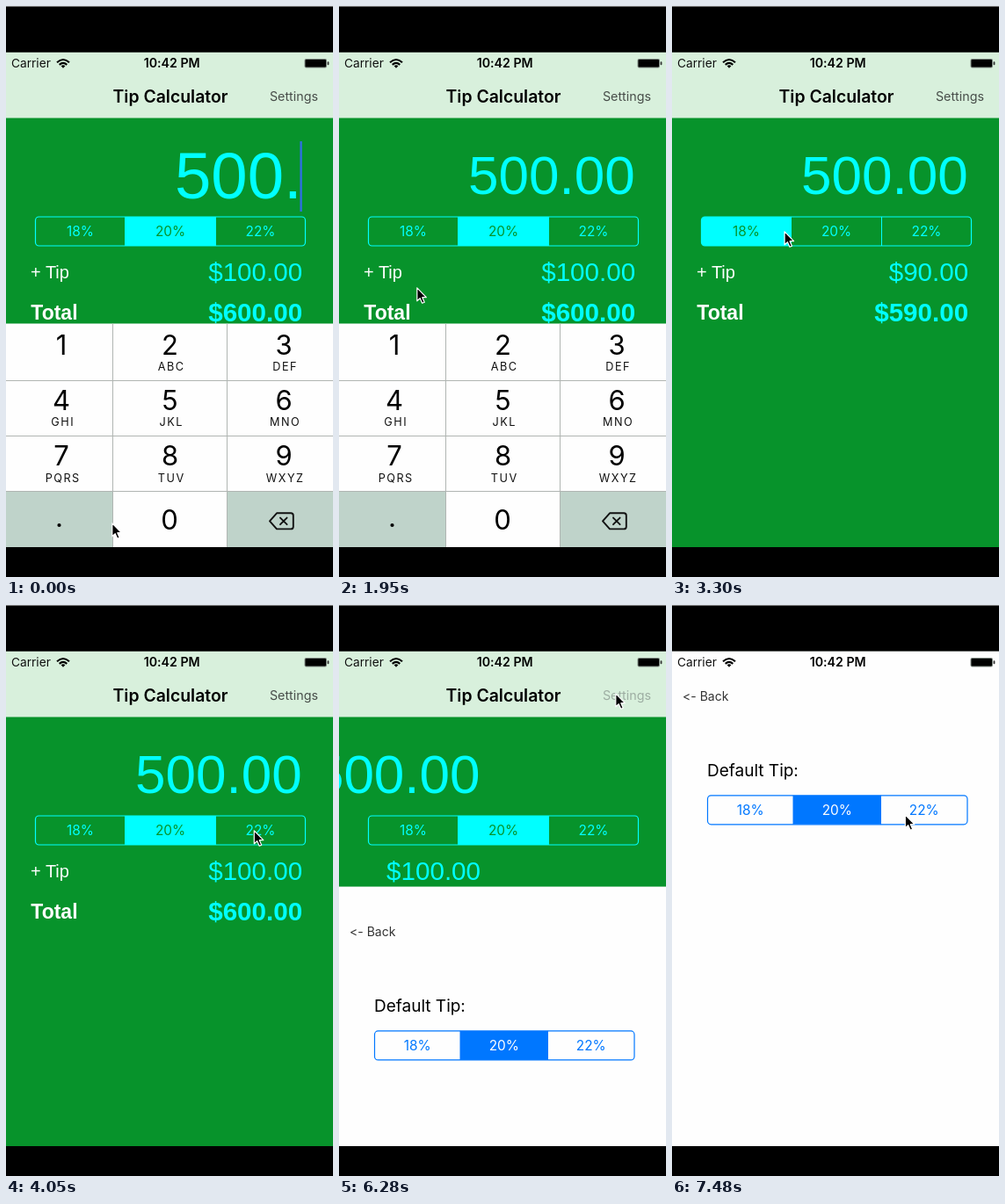
Write an HTML page that moves like this. It is 372 px wide and 650 px high and loops after 8000 ms.

```html
<!DOCTYPE html>
<html lang="en">
<head>
<meta charset="utf-8">
<title>Tip Calculator</title>
<style>
  html, body { margin: 0; width: 100%; height: 100%; overflow: hidden; background: #000; }
  svg { display: block; width: 100%; height: 100%; }
  text {
    font-family: Inter, Roboto, sans-serif; white-space: pre;
    font-variant-ligatures: none; font-feature-settings: "calt" 0, "liga" 0;
  }
  .sans { font-family: "Liberation Sans", Arial, sans-serif; }
  .caps { letter-spacing: 1.5px; }
</style>
</head>
<body>
<svg id="stage" viewBox="0 0 372 650"></svg>
<script>
const LOOP = 8000;
const GREEN = '#07932b', CYAN = '#00ffff', BLUE = '#0077ff';
const MINT = '#d8f0dc', KEY = '#bfd3ca', LINE = '#b0b5b2';
const stage = document.getElementById('stage');

function add(parent, tag, attrs, content) {
  const el = document.createElementNS('http://www.w3.org/2000/svg', tag);
  set(el, attrs);
  if (content !== undefined) el.textContent = content;
  parent.appendChild(el);
  return el;
}
function set(el, attrs) {
  for (const name in attrs) el.setAttribute(name, attrs[name]);
}
function rect(parent, x, y, width, height, fill, more) {
  return add(parent, 'rect', { x, y, width, height, fill, ...more });
}
function label(parent, content, x, y, size, fill, more) {
  return add(parent, 'text', { x, y, 'font-size': size, fill, ...more }, content);
}
const group = parent => add(parent, 'g', {});
const move = (el, x, y) => el.setAttribute('transform', `translate(${x} ${y})`);
const middle = { 'text-anchor': 'middle' };
const right = { 'text-anchor': 'end', class: 'sans' };

// Segmented control; edges holds the four vertical borders.
function segments(parent, edges, y, height, color, back) {
  const [left, , , end] = edges;
  const id = 'clip' + left;
  const clip = add(parent, 'clipPath', { id });
  const frame = { x: left, y, width: end - left, height, rx: 4 };
  add(clip, 'rect', frame);
  const fills = group(parent);
  fills.setAttribute('clip-path', `url(#${id})`);
  const parts = ['18%', '20%', '22%'].map((name, i) => {
    const x = edges[i], width = edges[i + 1] - x, mid = x + width / 2;
    const fill = rect(fills, x, y, width, height, color);
    const at = [mid, y + height / 2 + 5.4, 15.4];
    return {
      fill,
      dark: label(parent, name, ...at, back, middle),
      lit: label(parent, name, ...at, color, middle)
    };
  });
  add(parent, 'rect', { ...frame, fill: 'none', stroke: color, 'stroke-width': 1.2 });
  for (const x of edges.slice(1, 3)) rect(parent, x - .5, y, 1, height, color);
  return levels => parts.forEach((part, i) => {
    part.fill.setAttribute('opacity', levels[i]);
    part.dark.setAttribute('opacity', levels[i]);
    part.lit.setAttribute('opacity', 1 - levels[i]);
  });
}

// Calculator screen
rect(stage, 0, 53, 372, 563, GREEN);
const amounts = group(stage);
const bill = label(amounts, '', 336.7, 219, 74.4, CYAN, right);
label(amounts, '+ Tip', 28, 309.8, 20, '#fff', { class: 'sans' });
const tip = label(amounts, '', 337.2, 312.6, 29.6, CYAN, right);
label(amounts, 'Total', 28.3, 356.8, 23, '#fff', { class: 'sans', 'font-weight': 700 });
const total = label(amounts, '', 337.2, 359.2, 29.6, CYAN, { ...right, 'font-weight': 700 });
const caret = rect(stage, 334.4, 154, 2.4, 80, '#2f6fe0');
const pickRate = segments(stage, [33.5, 135.5, 238.5, 340.5], 240, 33, CYAN, GREEN);
rect(stage, 0, 52.5, 372, 75, MINT);
label(stage, 'Tip Calculator', 187, 109.5, 19.4, '#000', { ...middle, 'font-weight': 600 });
const settings = label(stage, 'Settings', 355, 108, 14.3, '#474d49', { 'text-anchor': 'end' });

// Keypad
const pad = group(stage);
rect(pad, 0, 361.5, 372, 254.5, '#fefefe');
rect(pad, 0, 552.5, 121.5, 63.5, KEY);
rect(pad, 251.5, 552.5, 120.5, 63.5, KEY);
const zero = rect(pad, 121.5, 552.5, 130, 63.5, KEY);
for (const x of [121, 251]) rect(pad, x, 361.5, 1, 254.5, LINE);
for (const y of [426, 489, 552]) rect(pad, 0, y, 372, 1, LINE);
const centers = [63, 186.5, 316];
['', 'ABC', 'DEF', 'GHI', 'JKL', 'MNO', 'PQRS', 'TUV', 'WXYZ'].forEach((caps, i) => {
  const x = centers[i % 3], y = 397 + 63.2 * (i / 3 | 0);
  label(pad, i + 1, x, y, 31, '#000', middle);
  label(pad, caps, x + 1.7, y + 18.2, 12.7, '#111', { ...middle, class: 'caps' });
});
label(pad, '0', 186, 595.5, 31, '#000', middle);
add(pad, 'circle', { cx: 60.5, cy: 591, r: 2.1, fill: '#000' });
add(pad, 'path', {
  d: 'M308 577.3H324Q326.8 577.3 326.8 580V592.7Q326.8 595.4 324 595.4H308L300 586.4ZM312 582.6l7.6 7.6m0 -7.6l-7.6 7.6',
  fill: 'none', stroke: '#111', 'stroke-width': 1.9, 'stroke-linejoin': 'round', 'stroke-linecap': 'round'
});

// Settings sheet
const sheet = group(stage);
rect(sheet, 0, 52.5, 372, 563.5, '#fefefe');
label(sheet, '<- Back', 12, 109, 14, '#333');
label(sheet, 'Default Tip:', 40, 195.2, 19, '#000');
segments(sheet, [40.5, 138, 237.5, 336], 216.8, 33, BLUE, '#fefefe')([0, 1, 0]);

// Status bar
label(stage, 'Carrier', 6, 70, 13.7, '#111');
label(stage, '10:42 PM', 188.7, 70, 14.2, '#000', { ...middle, 'font-weight': 600 });
const wifi = { fill: 'none', stroke: '#000', 'stroke-width': 2.1 };
add(stage, 'path', { d: 'M58 64.2Q65 57.8 72 64.2M60.7 66.9Q65 63 69.3 66.9', ...wifi });
add(stage, 'path', { d: 'M62.6 68.2Q65 66.2 67.4 68.2L65 70.8Z' });
rect(stage, 339.5, 60, 25.5, 10.5, '#808a83', { rx: 2 });
rect(stage, 340.5, 61, 23.5, 8.5, '#000', { rx: 1 });
rect(stage, 365.6, 63.3, 1.8, 4, '#333', { rx: .8 });

// Letterbox and pointer
rect(stage, 0, 0, 372, 52.5, '#000');
rect(stage, 0, 0, 372, 1, '#777');
rect(stage, 0, 616, 372, 34, '#000');
const pointer = add(stage, 'path', {
  d: 'M.8 .8V15.8L4.2 12.7L6.7 18.3L9.2 17.2L6.8 11.7H11.3Z',
  fill: '#000', stroke: '#fff', 'stroke-width': 1.2, 'stroke-linejoin': 'round'
});

// Pointer stops: time, x, y
const route = [
  [0, 120, 588], [150, 171, 588], [300, 171, 588], [450, 171, 584],
  [1050, 171, 584], [1650, 88, 320], [2100, 88, 320], [2550, 69.5, 254],
  [3150, 69.5, 254], [3450, 185, 258], [3900, 185, 258], [4050, 281.5, 256],
  [4780, 281.5, 256], [4930, 186.5, 252], [5380, 186.5, 252], [5530, 304, 107],
  [5680, 304, 107], [5980, 314, 100], [6280, 314, 100], [7030, 282, 246.5],
  [7180, 282, 246.5], [7480, 264.5, 238]
];
// Rate choices: time, segment
const picks = [[-1000, 1], [3000, 0], [3750, 1], [4350, 2], [5230, 1]];

const clamp = v => Math.max(0, Math.min(1, v));
const smooth = v => v * v * (3 - 2 * v);
const money = v => '$' + v.toFixed(2);

function snap(t) {
  const base = t < 4490 ? 0 : 4480;
  const step = base + Math.floor((t - base) / 150) * 150;
  return base ? step : Math.min(step, 4350);
}

function pointerAt(t) {
  const next = route.findIndex(stop => stop[0] > t);
  if (next < 0) return route[route.length - 1].slice(1);
  const [t0, x0, y0] = route[next - 1], [t1, x1, y1] = route[next];
  const p = smooth((t - t0) / (t1 - t0));
  return [x0 + (x1 - x0) * p, y0 + (y1 - y0) * p];
}

function drawRate(t) {
  const now = picks.filter(pick => pick[0] <= t).length - 1;
  const [start, chosen] = picks[now];
  const age = t - start, levels = [0, 0, 0];
  if (now) levels[picks[now - 1][1]] = clamp(.87 - age / 100);
  levels[chosen] = clamp(.45 + age / 200);
  pickRate(levels);
  const extra = 500 * (.18 + .02 * chosen);
  tip.textContent = money(extra);
  total.textContent = money(500 + extra);
}

function drawBill(t) {
  const full = t >= 600;
  bill.textContent = full ? '500.00' : t >= 450 ? '500.0' : '500.';
  set(bill, full ? { 'font-size': 62, y: 213.6 } : { 'font-size': 74.4, y: 219 });
  set(caret, full ? { y: 157, height: 71 } : { y: 154, height: 80 });
  caret.setAttribute('opacity', t < 900 || (t >= 1350 && t < 1950) ? 1 : 0);
  zero.setAttribute('opacity', t >= 450 && t < 750 ? 1 : 0);
}

function draw(time) {
  const t = snap(time);
  drawBill(t);
  drawRate(t);
  move(pad, 0, 254.5 * smooth(clamp((t - 2000) / 400)));

  // Critically damped slide of the sheet
  const w = Math.max(0, t - 6180) * .01757;
  const rest = (1 + w) * Math.exp(-w);
  move(sheet, 0, t >= 7030 ? 0 : 563.5 * rest);
  move(amounts, -336 * (1 - rest), 0);
  settings.setAttribute('fill', t >= 6280 ? '#9dada2' : '#474d49');
  move(pointer, ...pointerAt(t));
}

const begin = performance.now();
function tick() {
  draw((performance.now() - begin) % LOOP);
  requestAnimationFrame(tick);
}
tick();
</script>
</body>
</html>
```
